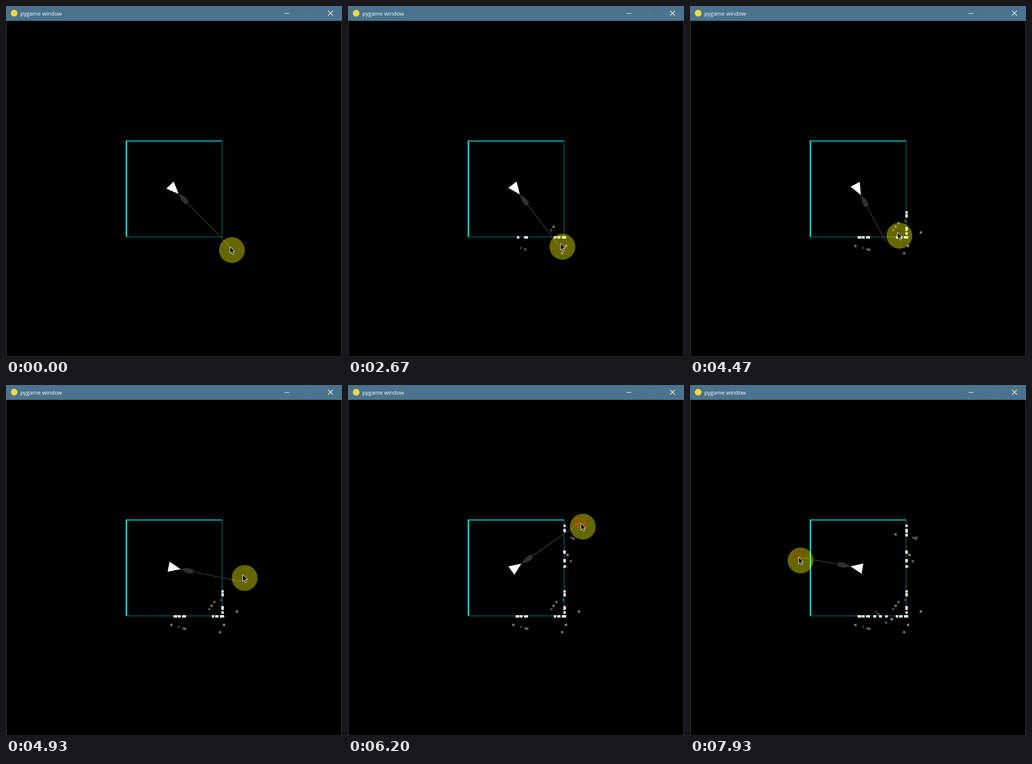
An HTML page with a canvas that plays this animation: 702 by 732 pixels, repeating every 8000 ms.

```html
<!DOCTYPE html>
<html lang="en">
<head>
<meta charset="utf-8">
<title>pygame window</title>
<style>
  html, body { margin: 0; width: 100%; height: 100%; overflow: hidden; background: #000; }
  canvas { display: block; }
</style>
</head>
<body>
<canvas id="stage" width="702" height="732"></canvas>
<script>
const ctx = document.getElementById('stage').getContext('2d');
const LOOP = 8000, FRAMES = 120, FLIGHT = 4;
const SHIP = { x: 350, y: 381 };
const WALL = { left: 251.5, top: 281.5, right: 451.5, bottom: 481.5 };

// Pointer tip rests: [frame, x, y], eased in between
const path = [
  [0, 468, 502], [10, 459, 498], [28, 459, 498], [29, 437, 513],
  [34, 373, 530], [40, 444, 495], [47, 481, 457], [57, 354, 508],
  [64, 382, 511], [70, 485, 433], [79, 508, 343], [88, 481, 282],
  [95, 488, 290], [102, 433, 528], [108, 410, 540], [114, 228, 342],
  [118, 227, 359]
];
const clicks = [20, 26, 34, 47, 50, 57, 76, 79, 88, 92, 102, 107, 117];

const ease = k => k * k * (3 - 2 * k);

function seeded(seed) {
  return () => {
    seed = (seed * 16807) % 2147483647;
    return seed / 2147483647;
  };
}

function pointerAt(frame) {
  const next = path.findIndex(key => key[0] > frame);
  if (next === 0) return { x: path[0][1], y: path[0][2] };
  const [t0, x0, y0] = path.at(next < 0 ? -1 : next - 1);
  const [t1, x1, y1] = path.at(next);
  const k = t1 === t0 ? 0 : ease((frame - t0) / (t1 - t0));
  return { x: x0 + (x1 - x0) * k, y: y0 + (y1 - y0) * k };
}

// Where a shot from the ship towards the aim meets the walls
function wallHit(aim) {
  const dx = aim.x - SHIP.x, dy = aim.y - SHIP.y;
  const toSide = ((dx > 0 ? WALL.right : WALL.left) - SHIP.x) / dx;
  const toLevel = ((dy > 0 ? WALL.bottom : WALL.top) - SHIP.y) / dy;
  const k = Math.min(toSide, toLevel);
  return { x: SHIP.x + dx * k, y: SHIP.y + dy * k, onSide: toSide < toLevel };
}

// Each shot leaves bright marks along the wall and faint ones around it
function impactMarks(click) {
  const random = seeded(click * 7919);
  random();
  const hit = wallHit(pointerAt(click));
  return Array.from({ length: 5 }, (_, i) => {
    const onWall = i < 3;
    const along = (random() - 0.5) * (onWall ? 22 : 44);
    const across = onWall ? 1 : (random() - 0.4) * 60;
    return {
      x: Math.round(hit.x + (hit.onSide ? across : along) - 2.5),
      y: Math.round(hit.y + (hit.onSide ? along : across) - 2.5),
      alpha: onWall ? 0.85 + random() * 0.15 : 0.15 + random() * 0.4
    };
  });
}
const shots = clicks.map(click => ({ click, tip: pointerAt(click), marks: impactMarks(click) }));

function line(color, width, x1, y1, x2, y2) {
  ctx.strokeStyle = color;
  ctx.lineWidth = width;
  ctx.beginPath();
  ctx.moveTo(x1, y1);
  ctx.lineTo(x2, y2);
  ctx.stroke();
}

function polygon(color, points) {
  ctx.fillStyle = color;
  ctx.beginPath();
  points.forEach(([x, y]) => ctx.lineTo(x, y));
  ctx.closePath();
  ctx.fill();
}

function disc(color, x, y, r) {
  ctx.fillStyle = color;
  ctx.beginPath();
  ctx.arc(x, y, r, 0, 2 * Math.PI);
  ctx.fill();
}

function drawWindow() {
  ctx.fillStyle = '#000';
  ctx.fillRect(0, 0, 702, 732);
  ctx.strokeStyle = '#444';
  ctx.lineWidth = 1;
  ctx.strokeRect(0.5, 0.5, 701, 731);
  ctx.fillStyle = '#4b738e';
  ctx.fillRect(0, 0, 702, 31);
  disc('#f0d840', 17, 15, 7);
  ctx.fillStyle = '#fff';
  ctx.font = '11.5px "Open Sans", "Noto Sans", sans-serif';
  ctx.fillText('pygame window', 30, 20);
  line('#fff', 1, 582, 15.5, 592, 15.5);
  ctx.strokeStyle = '#587d90';
  ctx.strokeRect(627.5, 10.5, 9, 9);
  line('#fff', 1.2, 673, 10, 683, 20);
  line('#fff', 1.2, 683, 10, 673, 20);
}

function drawWalls() {
  const { left, top, right, bottom } = WALL;
  line('#003838', 3, right, top, right, bottom);
  line('#003838', 3, left, bottom, right + 1.5, bottom);
  line('#0b9096', 3, left, top, right, top);
  line('#14d0d0', 3, left, top - 1, left, bottom);
}

function drawShip(aim) {
  const dx = aim.x - SHIP.x, dy = aim.y - SHIP.y;
  ctx.save();
  ctx.translate(SHIP.x, SHIP.y);
  ctx.rotate(Math.atan2(dy, dx));
  line('#3a3a3c', 1.5, 15, 0, Math.hypot(dx, dy), 0);
  polygon('#303032', [[15, 0], [28, -5], [40, -5], [43, 0], [40, 5], [28, 5]]);
  polygon('#fff', [[15, 0], [-10.5, -10.8], [-10.5, 10.8]]);
  ctx.restore();
}

function drawMarks(frame) {
  for (const { click, marks } of shots) {
    if (frame < click + FLIGHT) continue;
    for (const { x, y, alpha } of marks) {
      ctx.fillStyle = `rgba(255, 255, 255, ${alpha})`;
      ctx.fillRect(x, y, 5, 5);
    }
  }
}

function drawRings(frame) {
  for (const { click, tip } of shots) {
    const age = frame - click;
    if (age < 0 || age > 4) continue;
    ctx.strokeStyle = `rgba(${240 - age * 20}, ${90 - age * 25}, 0, ${1 - age * 0.15})`;
    ctx.lineWidth = 2.5;
    ctx.beginPath();
    ctx.arc(tip.x, tip.y, 9.5, 0, 2 * Math.PI);
    ctx.stroke();
  }
}

function drawPointer({ x, y }) {
  ctx.save();
  ctx.translate(x, y);
  polygon('#000', [[0, 0], [0, 14], [3, 11], [5.5, 16.5], [8, 15.5], [5.5, 10], [10, 10]]);
  ctx.strokeStyle = '#fff';
  ctx.lineWidth = 1;
  ctx.stroke();
  ctx.restore();
}

function draw(time) {
  const frame = Math.round((time % LOOP) / LOOP * FRAMES) % FRAMES;
  const tip = pointerAt(frame);
  drawWindow();
  drawWalls();
  drawShip(pointerAt(frame - 1)); // the ship trails the pointer by one frame
  drawMarks(frame);
  disc('rgba(255, 255, 0, 0.4)', tip.x + 4, tip.y + 7, 27);
  drawRings(frame);
  drawPointer(tip);
}

const start = performance.now();
function tick() {
  draw(performance.now() - start);
  requestAnimationFrame(tick);
}
tick();
</script>
</body>
</html>
```
